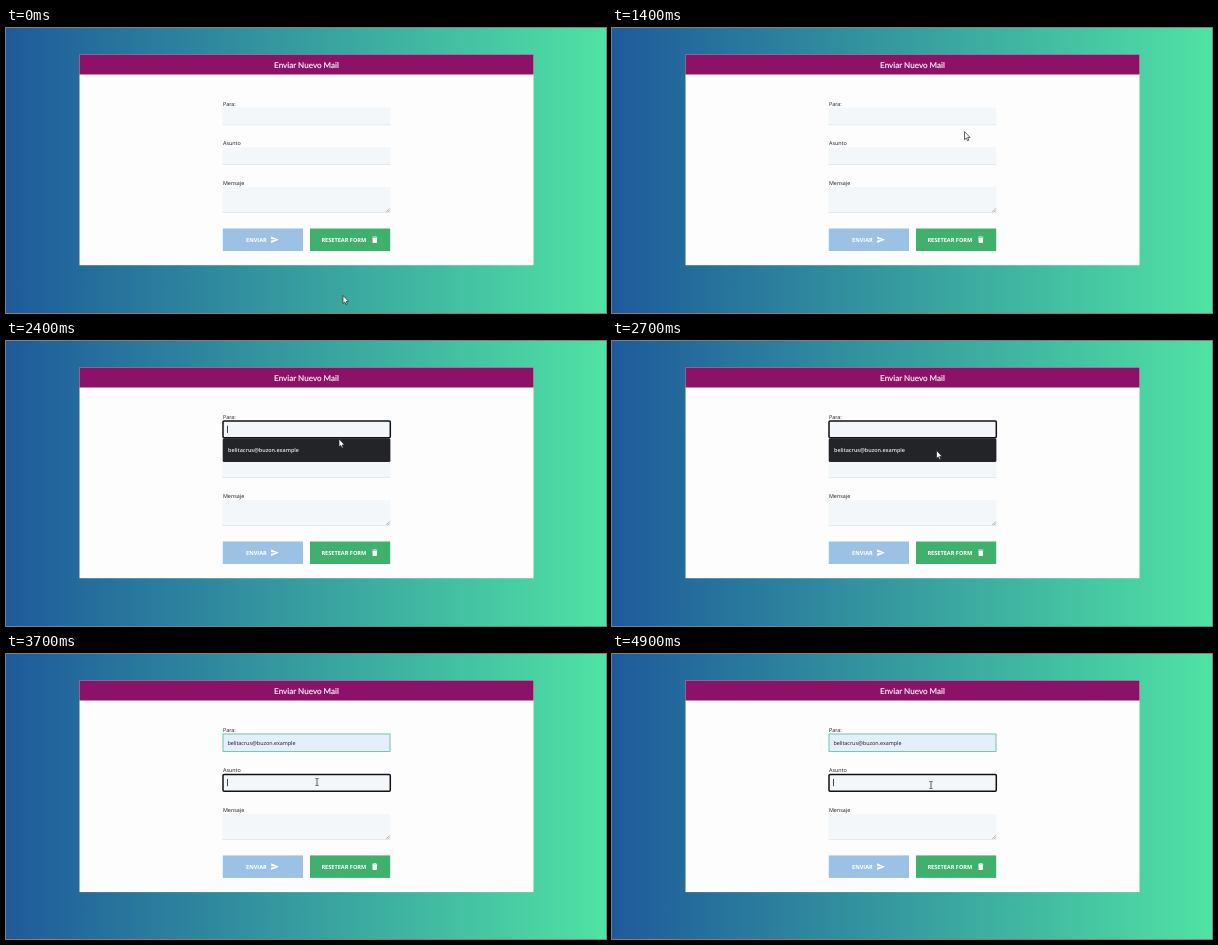
An HTML page that plays this animation: 600 by 285 pixels, repeating every 5 s.

```html
<!DOCTYPE html>
<html lang="es">
<head>
<meta charset="utf-8">
<title>Enviar Nuevo Mail</title>
<style>
  html, body { margin: 0; width: 100%; height: 100%; overflow: hidden; }
  svg { display: block; width: 100%; height: 100%; background: linear-gradient(90deg, #1e5a9b, #50e2a4); }
  text { font: 5.4px "Open Sans", sans-serif; fill: #17171a; text-rendering: geometricPrecision; }
  .title { font: 8.1px Lato, sans-serif; fill: #fff; stroke: #fff; stroke-width: .15px; text-anchor: middle; }
  .action { font-size: 5.6px; font-weight: 700; fill: #fff; }
  .option { font-size: 5.45px; font-weight: 600; fill: #e8eaed; }
  .field { fill: #f4f7f9; }
  .rule { fill: #dde2e5; }
  .ring { fill: none; stroke: #101014; stroke-width: 1.5; }
  .hidden { display: none; }
</style>
</head>
<body>
<svg viewBox="0 0 600 285" preserveAspectRatio="none">
  <rect id="card" x="73.5" y="26.5" width="454" height="210.7" fill="#fefdfe"/>
  <rect x="73.5" y="26.5" width="454" height="20" fill="#8c1268"/>
  <text class="title" x="300.5" y="39.7">Enviar Nuevo Mail</text>

  <text x="217" y="78">Para:</text>
  <rect id="to" class="field" x="216.5" y="79.5" width="168" height="17.5"/>
  <rect id="toRule" class="rule" x="216.5" y="96.5" width="168" height=".7"/>
  <rect id="valid" x="217" y="80" width="167" height="17.5" fill="none" stroke="#62c898" stroke-width=".9"/>
  <text id="address" x="221.4" y="90.9">belitacrus@buzon.example</text>

  <g id="lower">
    <text x="217" y="117.4">Asunto</text>
    <rect class="field" x="216.5" y="119.2" width="168" height="17.5"/>
    <rect class="rule" x="216.5" y="136.2" width="168" height=".7"/>
    <text x="217" y="157.3">Mensaje</text>
    <rect class="field" x="216.5" y="159" width="168" height="25.7"/>
    <rect class="rule" x="216.5" y="184.3" width="168" height=".7"/>
    <path d="M380.3 184 383.8 180.5M382.3 184 383.8 182.5" stroke="#777" stroke-width=".6"/>
    <rect x="216.8" y="200.5" width="80.2" height="22.5" fill="#9bc1e4"/>
    <text class="action" x="240" y="213.9">ENVIAR</text>
    <path transform="translate(264.4 207.3) scale(.37)" fill="#fff"
      d="M2 21 23 12 2 3V10L17 12 2 14Z"/>
    <rect x="304" y="200.5" width="80.2" height="22.5" fill="#3fb16c"/>
    <text class="action" x="315.4" y="213.9">RESETEAR FORM</text>
    <path transform="translate(364.3 207.3) scale(.37)" fill="#fff"
      d="M6 19Q6 21 8 21H16Q18 21 18 19V7H6ZM19 4H15.5L14.5 3H9.5L8.5 4H5V6H19Z"/>
  </g>

  <rect id="ring" class="ring" x="217" width="167.3" height="16.8" rx="1.2"/>
  <rect id="caret" width=".8" height="7.2" fill="#17171a"/>
  <g id="menu">
    <rect x="216.7" y="97.3" width="167.7" height="23.7" rx="1.5" fill="#232427"/>
    <text class="option" x="222" y="111">belitacrus@buzon.example</text>
  </g>

  <path id="arrow" d="M0 0V8L1.8 6.4 3 9.1 4.3 8.5 3.1 5.9H5.6Z" fill="#fff" stroke="#222" stroke-width=".7"/>
  <path id="beam" d="M-1.6-3.5H-.5L0-3 .5-3.5H1.6M0-3V3M-1.6 3.5H-.5L0 3 .5 3.5H1.6" fill="none" stroke="#333" stroke-width=".8"/>
</svg>
<script>
const LOOP = 5000, STEP = 100;
const FOCUS_TO = 1600, OPEN_MENU = 2100, PICK = 2800, FOCUS_SUBJECT = 3500;

// Pointer stops: time, x, y
const stops = [
  [0, 337, 267.5], [950, 337, 267.5], [1500, 354, 88], [2100, 354, 88],
  [2400, 333, 98], [2600, 325, 109], [2800, 324, 110], [3100, 319, 117.5],
  [3250, 319, 117.5], [3500, 311, 128], [3800, 311, 128], [4200, 319, 131], [LOOP, 319, 131]
];

const el = id => document.getElementById(id);
const show = (id, visible) => el(id).classList.toggle('hidden', !visible);
const set = (id, attrs) => Object.entries(attrs).forEach(([k, v]) => el(id).setAttribute(k, v));
const ease = p => p * p * (3 - 2 * p);

function pointerAt(t) {
  const i = stops.findIndex(s => s[0] > t);
  const [t0, x0, y0] = stops[i - 1], [t1, x1, y1] = stops[i];
  const p = ease((t - t0) / (t1 - t0));
  return [x0 + (x1 - x0) * p, y0 + (y1 - y0) * p];
}

function draw(t) {
  const menuOpen = t >= OPEN_MENU && t < PICK;
  const filled = t >= PICK, onSubject = t >= FOCUS_SUBJECT;
  const shift = onSubject ? .9 : 0;

  set('card', { height: 210.7 + shift });
  set('lower', { transform: `translate(0 ${shift})` });
  set('to', { fill: filled ? '#e7eefb' : '#f4f7f9' });
  el('to').classList.toggle('field', !filled);
  show('toRule', !onSubject);
  show('valid', onSubject);
  show('address', filled);
  set('address', { y: 90.9 + shift / 2 });
  show('menu', menuOpen);

  show('ring', t >= FOCUS_TO);
  set('ring', { y: onSubject ? 120.4 : 79.9 });

  const lastInput = [FOCUS_SUBJECT, PICK, OPEN_MENU, FOCUS_TO].find(time => t >= time);
  show('caret', lastInput && (t - lastInput) % 1000 < 500);
  const afterText = 221.4 + el('address').getComputedTextLength();
  set('caret', { x: filled && !onSubject ? afterText : 221.2, y: onSubject ? 125 : 84.8 });

  const [x, y] = pointerAt(t);
  const inside = (top, bottom) => x > 217 && x < 384 && y > top && y < bottom;
  const overText = inside(79, 97) || inside(119.5, 137) || inside(159, 185);
  show('beam', overText);
  show('arrow', !overText);
  set(overText ? 'beam' : 'arrow', { transform: `translate(${x} ${y})` });
}

const start = performance.now();
function tick() {
  const t = (performance.now() - start) % LOOP;
  draw(Math.floor(t / STEP) * STEP);
  requestAnimationFrame(tick);
}
tick();
</script>
</body>
</html>
```
